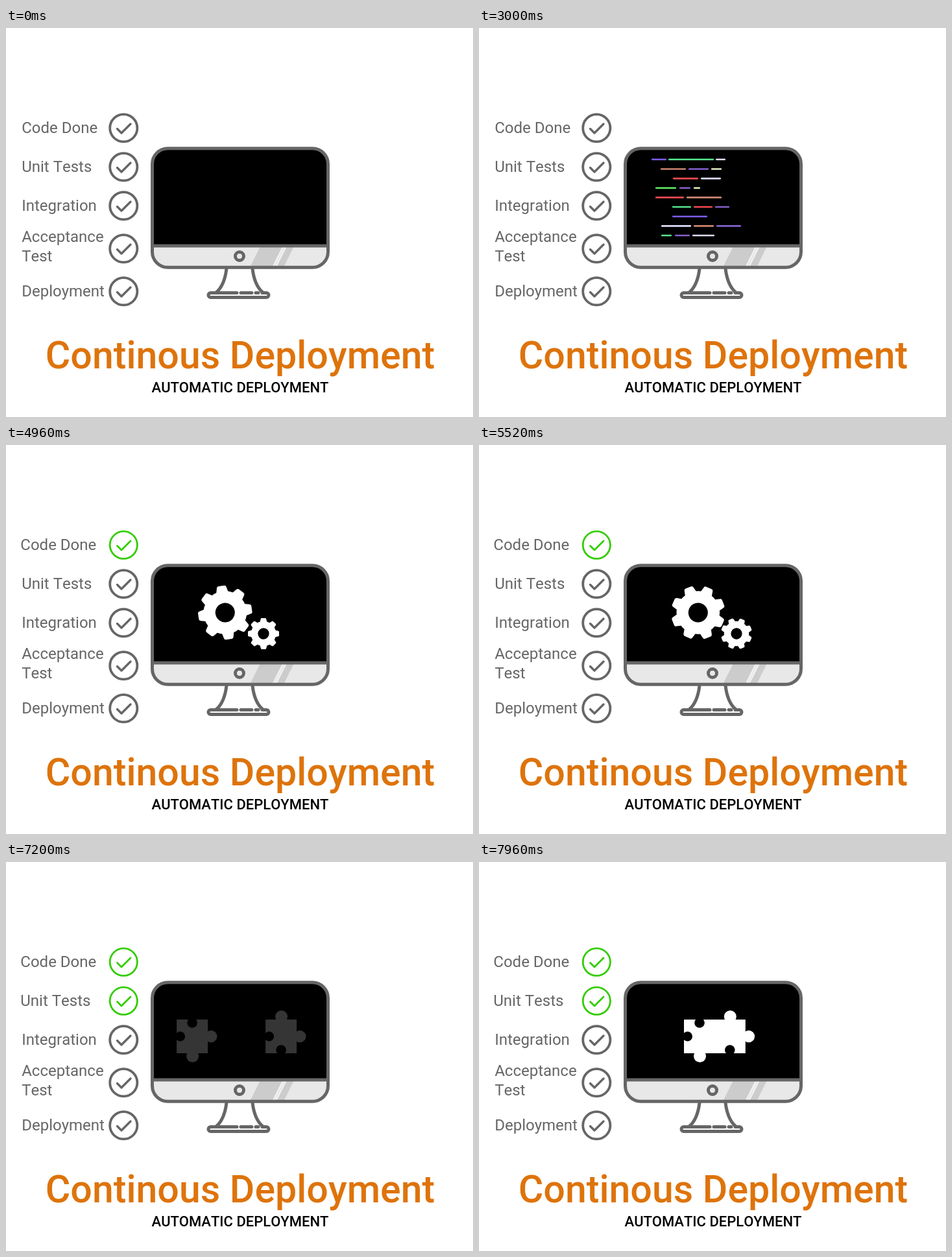
Animation, 720 px wide and 600 px high, one loop 8 s. Source, as an HTML page:

```html
<!DOCTYPE html>
<html lang="en">
<head>
<meta charset="utf-8">
<title>Continous Deployment</title>
<style>
html, body { margin: 0; width: 100%; height: 100%; overflow: hidden; background: #fff; }
svg { display: block; width: 720px; height: 600px; }
text { font-family: Roboto, sans-serif; font-kerning: none; }
.label { font-size: 24px; fill: #666; }
.title { font-size: 59px; font-weight: 500; text-anchor: middle; fill: #de730b; }
.sub { font-size: 22px; font-weight: 500; text-anchor: middle; }
.line { fill: none; stroke: #666; stroke-width: 5; stroke-linecap: round; stroke-linejoin: round; }
.ring, .tick { fill: none; stroke: #666; stroke-linecap: round; stroke-linejoin: round; }
.ring { stroke-width: 3.8; }
.tick { stroke-width: 3.4; }
.done .ring, .done .tick { stroke: #3c0; stroke-width: 2.8; }
</style>
</head>
<body>
<svg viewBox="0 0 720 600">
  <defs>
    <clipPath id="case"><rect x="225.5" y="185.700" width="271" height="183.600" rx="24"/></clipPath>
    <g id="gear">
      <circle r="33.300" fill="#fff"/>
      <g id="teeth" fill="#fff"></g>
      <circle r="15"/>
    </g>
  </defs>
  <rect width="720" height="600" fill="#fff"/>

  <g id="steps"></g>

  <g clip-path="url(#case)">
    <rect x="225" y="185" width="272" height="151"/>
    <rect x="225" y="336" width="272" height="34" fill="#e8e8e8"/>
    <path d="M392 337H426L410 369H376Z M433 337H444L428 369H417Z" fill="#ccc"/>
    <path d="M427.500 337L411.500 369M432 337L416 369" stroke="#f4f4f4" stroke-width="1.500"/>
  </g>
  <g class="line">
    <path d="M340 371Q337 397 324 408M380 371Q383 397 396 408"/>
    <path d="M356 408.500H315.500a3.500 3.500 0 0 0 0 7H401.500a3.500 3.500 0 0 0 0 -7H395M362 408.500H379M385 408.500H389"/>
    <rect x="225.5" y="185.700" width="271" height="183.600" rx="24"/>
    <path d="M226 336H496"/>
    <circle cx="360" cy="352" r="6.5"/>
  </g>

  <g id="code" fill="none" stroke-width="2.6" stroke-linecap="round"></g>

  <g id="gears">
    <use id="big" href="#gear"/>
    <use id="small" href="#gear"/>
  </g>

  <g id="puzzle">
    <g id="right">
      <path d="M0 243H48V295H0Z" fill="#fff"/>
      <g fill="#fff"><circle cx="24.500" cy="238.500" r="9.500"/><circle cx="53" cy="269" r="9.300"/></g>
      <circle cx="5.500" cy="269" r="7.500"/><circle cx="24" cy="290" r="7.800"/>
    </g>
    <g id="left">
      <path d="M0 243H48V295H0Z" fill="#fff"/>
      <g fill="#fff"><circle cx="24.500" cy="299.500" r="9.500"/><circle cx="53" cy="269" r="9.300"/></g>
      <circle cx="5.500" cy="269" r="7.500"/><circle cx="24" cy="248" r="7.800"/>
    </g>
  </g>

  <text class="title" x="361" y="525">Continous Deployment</text>
  <text class="sub" x="361" y="562">AUTOMATIC DEPLOYMENT</text>
</svg>
<script>
const LOOP = 8000, TICK = 40;
const byId = id => document.getElementById(id);

function add(parent, tag, attrs, content = '') {
  const el = document.createElementNS('http://www.w3.org/2000/svg', tag);
  for (const key in attrs) el.setAttribute(key, attrs[key]);
  el.textContent = content;
  return parent.appendChild(el);
}

// Checklist: centre height, time it turns green, lines of text
const steps = [
  [154, 3400, 'Code Done'],
  [214, 6400, 'Unit Tests'],
  [274, Infinity, 'Integration'],
  [340, Infinity, 'Acceptance', 'Test'],
  [406, Infinity, 'Deployment']
].map(([y, at, ...lines]) => {
  const g = add(byId('steps'), 'g', {});
  const labels = lines.map((line, i) => add(g, 'text',
    { class: 'label', y: y + 8 + 30 * i - 18 * (lines.length - 1) }, line));
  add(g, 'circle', { class: 'ring', cx: 181.3, cy: y + 0.3, r: 21.1 });
  add(g, 'path', { class: 'tick', d: `M171.500 ${y + 1.5}L178 ${y + 8}L192 ${y - 6}` });
  return { g, labels, at };
});

// Code rows: colour, left, right for each dash
const violet = '#7d5cf0', purple = '#8560cc', green = '#55e68a', lime = '#5fee66',
  salmon = '#cc8570', red = '#f04a50', pale = '#dcdcf8', cream = '#e4eec8';
const rows = [
  [violet, 266, 289, green, 292, 362, pale, 365, 380],
  [salmon, 280, 319, purple, 323, 354, cream, 358, 374],
  [red, 299, 338, pale, 342, 373],
  [lime, 272, 304, purple, 309, 326, cream, 331, 341],
  [red, 272, 316, salmon, 320, 374],
  [green, 298, 327, red, 331, 360, purple, 364, 386],
  [violet, 298, 352],
  [pale, 281, 327, salmon, 331, 362, purple, 366, 404],
  [green, 281, 297, purple, 302, 325, pale, 329, 363]
].map((spec, i) => {
  const dashes = [];
  for (let k = 0; k < spec.length; k += 3) {
    const [stroke, a, b] = spec.slice(k, k + 3);
    dashes.push({ el: add(byId('code'), 'path', { stroke }), a, b });
  }
  return {
    dashes, y: 202.8 + 14.65 * i,
    start: Math.max(120 + 40 * i, 960 - 310 * (8 - i)) - TICK,
    end: 520 + 310 * i
  };
});

for (let i = 0; i < 8; i++) {
  add(byId('teeth'), 'path', {
    d: 'M-9.300 -31L-7.400 -39Q-7 -41.500 -4.500 -41.500H4.500Q7 -41.500 7.400 -39L9.300 -31Z',
    transform: `rotate(${45 * i})`
  });
}

const progress = (t, from, to) => Math.min(1, Math.max(0, (t - from) / (to - from)));
const show = (el, on) => el.setAttribute('visibility', on ? 'visible' : 'hidden');

function drawSteps(t) {
  for (const { g, labels, at } of steps) {
    const done = t >= at;
    g.setAttribute('class', done ? 'done' : '');
    labels.forEach(label => label.setAttribute('x', done ? 22.3 : 24.2));
  }
}

function drawCode(t) {
  show(byId('code'), t >= 120 && t < 3600);
  for (const { dashes, y, start, end } of rows) {
    const first = dashes[0].a, last = dashes[dashes.length - 1].b;
    const tip = first + (last - first) * progress(t, start, end);
    for (const { el, a, b } of dashes) {
      const stop = Math.min(b, tip);
      el.setAttribute('d', stop > a ? `M${a + 1.2} ${y}H${Math.max(a + 1.3, stop - 1.2)}` : '');
    }
  }
}

function drawGears(t) {
  const gears = byId('gears'), p = progress(t, 4240, 6120);
  show(gears, t >= 4240 && t < 6720);
  gears.setAttribute('opacity', progress(t, 4200, 4600));
  byId('big').setAttribute('transform', `translate(337.800 258.500) rotate(${104 * p ** 1.08})`);
  byId('small').setAttribute('transform', `translate(397 291) scale(.578) rotate(${-4 - 225 * p})`);
}

function drawPuzzle(t) {
  const p = progress(t, 7040, 7960);
  show(byId('puzzle'), t >= 7040);
  byId('puzzle').setAttribute('opacity', progress(t, 7000, 7960));
  byId('left').setAttribute('transform', `translate(${252 + 64 * p})`);
  byId('right').setAttribute('transform', `translate(${408 - 45.2 * p})`);
}

function frame(now) {
  const t = Math.floor(now % LOOP / TICK) * TICK;
  drawSteps(t);
  drawCode(t);
  drawGears(t);
  drawPuzzle(t);
  requestAnimationFrame(frame);
}
frame(performance.now());
</script>
</body>
</html>
```
